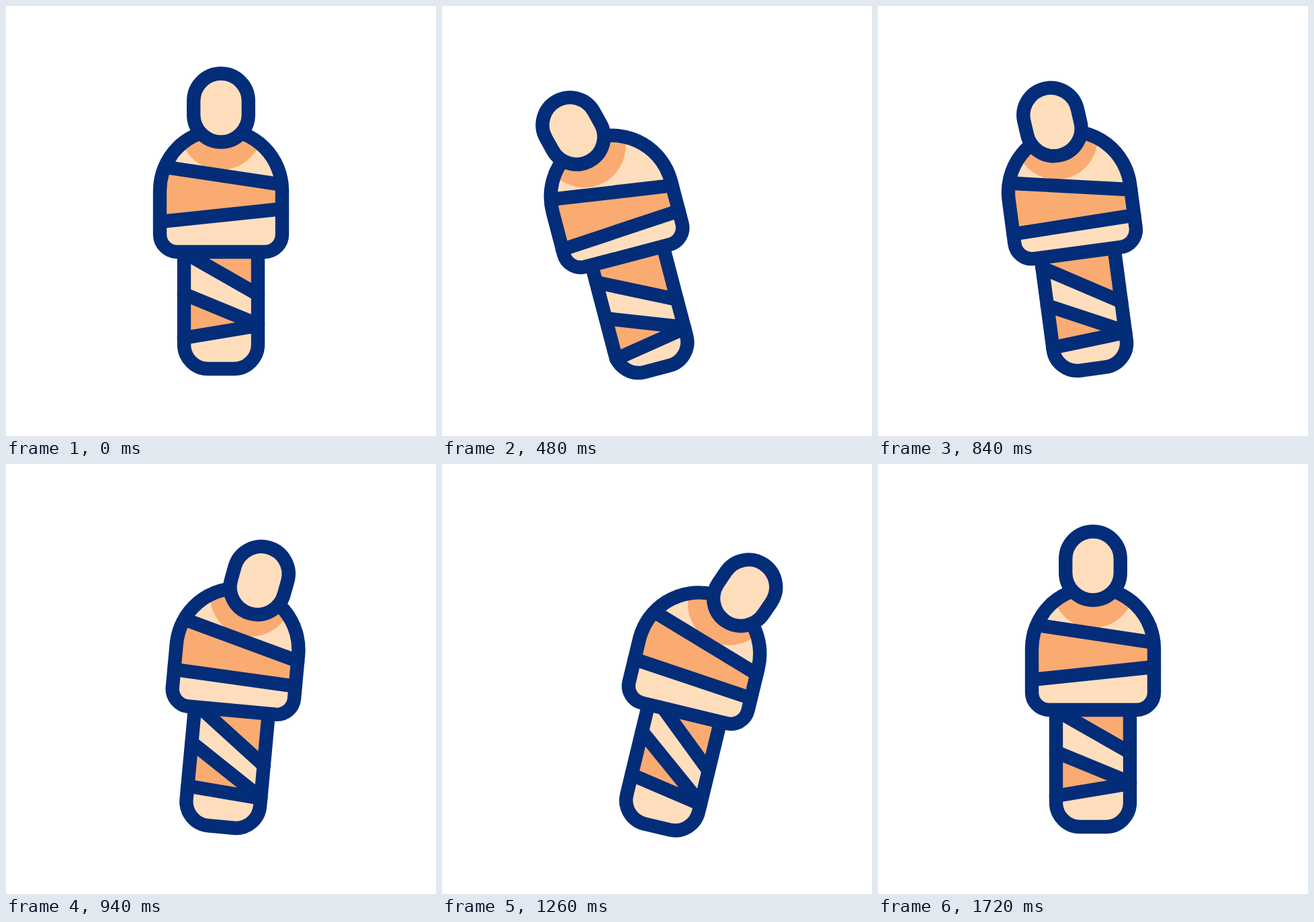
Animation, 640 px wide and 640 px high, one loop 1.98 s. Source, as an HTML page:

```html
<!DOCTYPE html>
<html lang="en">
<head>
<meta charset="utf-8">
<title>Swaying mummy</title>
<style>
  html, body { margin: 0; height: 100%; overflow: hidden; background: #fff; }
  svg { display: block; width: 100%; height: 100%; }
  .line { fill: none; stroke: #032d78; stroke-width: 20.4; stroke-linecap: round; stroke-linejoin: round; }
  .light { fill: #ffdebd; }
  .dark { fill: #faab71; }
</style>
</head>
<body>
<svg viewBox="0 0 640 640">
  <defs>
    <path id="torso" d="M229 275a91 91 0 0 1 182 0V340a26 26 0 0 1-26 26H255a26 26 0 0 1-26-26z"/>
    <path id="legs" d="M265 366V504a36 36 0 0 0 36 36H339a36 36 0 0 0 36-36V366"/>
    <rect id="face" x="-40.8" y="-51" width="81.6" height="102" rx="40.8"/>
    <clipPath id="inTorso"><use href="#torso"/></clipPath>
  </defs>
  <g id="figure">
    <use href="#legs" class="light"/>
    <path id="legTop" class="dark"/>
    <path id="legLow" class="dark"/>
    <path id="legWraps" class="line"/>
    <use href="#legs" class="line"/>
    <use href="#torso" class="light"/>
    <g clip-path="url(#inTorso)">
      <circle id="shade" class="dark" r="61.5"/>
      <path id="chest" class="dark"/>
    </g>
    <path id="chestWraps" class="line"/>
    <use href="#torso" class="line"/>
    <g id="head">
      <use href="#face" class="light"/>
      <use href="#face" class="line"/>
    </g>
  </g>
</svg>
<script>
const LOOP = 1980, LEFT = 600, RIGHT = 1190, REST = 1710;
const $ = id => document.getElementById(id);
const set = (id, name, value) => $(id).setAttribute(name, value);

// Cubic bezier easing (.66, 0, .34, 1)
function ease(x) {
  let lo = 0, hi = 1, s;
  for (let i = 0; i < 24; i++) {
    s = (lo + hi) / 2;
    const u = 1 - s;
    if (3 * u * u * s * .66 + 3 * u * s * s * .34 + s ** 3 < x) lo = s; else hi = s;
  }
  return s * s * (3 - 2 * s);
}

// How far the pose is towards the left and the right lean
function weights(t) {
  if (t < LEFT) return [ease(t / LEFT), 0];
  if (t < RIGHT) {
    const p = ease((t - LEFT) / (RIGHT - LEFT));
    return [1 - p, p];
  }
  return t < REST ? [0, 1 - ease((t - RIGHT) / (REST - RIGHT))] : [0, 0];
}

function draw(t) {
  const [l, r] = weights(t);
  const mix = (rest, left, right) => rest + l * left + r * right;

  // Wrap ends slide along the sides of the body
  const chestA = [[mix(237, -6, 6), mix(239.8, 17, -9.5)], [mix(409, 2, 2), mix(265.7, 16.8, 18.8)]];
  const chestB = [[229, mix(321, 12, -16)], [411, mix(302, 19.5, 19.5)]];
  const legA = [[265, mix(366.6, 27, -20)], [375, mix(429.5, 19, 11.5)]];
  const legB = [[265, mix(428.8, 20, -22)], [375, mix(474, 17, 17.5)]];
  const legC = [[265, mix(494, 17, -21)], [375, mix(475.8, 17, 16.5)]];
  const band = (a, b) => `M${a[0]}L${a[1]}L${b[1]}L${b[0]}z`;
  const wraps = (...list) => list.map(w => `M${w[0]}L${w[1]}`).join('');

  set('figure', 'transform', `rotate(${mix(0, -15.3, 13.8)} 320 540)`);
  set('head', 'transform', `translate(${mix(320, -32, 46)} ${mix(151.5, 15, 19.6)}) rotate(${mix(0, -15, 21)})`);
  set('shade', 'cx', mix(320, -21.5, 27));
  set('shade', 'cy', mix(182.5, 10, 10));
  set('chest', 'd', band([[200, chestA[0][1]], chestA[1]], [[200, chestB[0][1]], chestB[1]]));
  set('chestWraps', 'd', wraps(chestA, chestB));
  set('legTop', 'd', band([[265, 366], [375, 366]], legA));
  set('legLow', 'd', band(legB, legC));
  set('legWraps', 'd', wraps(legA, legB, legC));
}

function tick() {
  draw(performance.now() % LOOP);
  requestAnimationFrame(tick);
}
tick();
</script>
</body>
</html>
```
